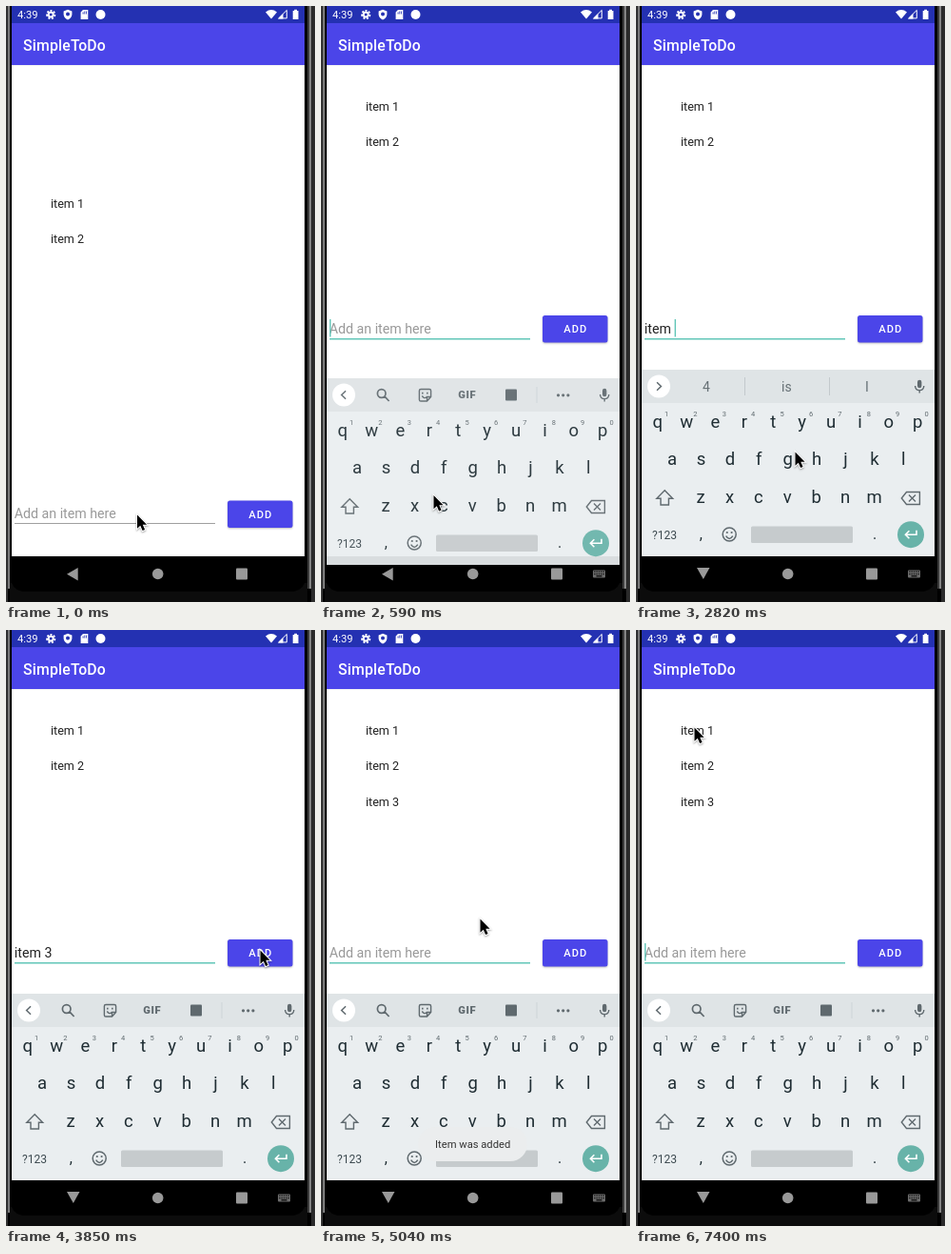
An HTML page with a canvas that plays this animation: 325 px wide and 626 px high, repeating every 8 s.

```html
<!DOCTYPE html>
<html lang="en">
<head>
<meta charset="utf-8">
<title>To-do list demo</title>
<style>
  html, body { margin: 0; width: 100%; height: 100%; overflow: hidden; background: #000; }
  canvas { display: block; }
</style>
</head>
<body>
<canvas id="stage" width="325" height="626"></canvas>
<script>
const W = 325, H = 626, LOOP = 8000;
const stage = document.getElementById('stage').getContext('2d');
const keyLayer = document.createElement('canvas');
keyLayer.width = W;
keyLayer.height = H;
const keys = keyLayer.getContext('2d');
let c = stage;

const INK = '#1f2d33', ICON = '#5f696e', INDIGO = '#4b45e9', TEAL = '#62c6b8';
const SCREEN = new Path2D('M6 0H314V599Q313 615 298 615H22Q7 615 6 599Z');

// Each step overrides part of the state before it: [time, mouse, changes]
const steps = [
  [0, [137.5, 533.5], { up: false, focus: false, caret: false, kb: null, hideNav: false,
                        text: '', words: null, press: 0, items: 2, toast: 0 }],
  [150, [137, 533], { focus: true, caret: true }],
  [300, [127, 528], { up: true, kb: [75, .25] }],
  [440, [114, 520.5], { kb: [38, .6] }],
  [590, [118, 513], { kb: [9, .93] }],
  [740, [133, 499], { kb: [0, 1], hideNav: true, caret: false }],
  [890, [150, 483], {}],
  [1030, [163, 471], {}],
  [1180, [167, 467.5], { caret: true }],
  [1780, null, { caret: false }],
  [2080, null, { text: 'i', caret: true, words: ['I', 'in', 'is'] }],
  [2220, null, { text: 'it', words: ['it', 'it’s', 'its'] }],
  [2370, null, { text: 'ite', words: ['ite', 'item', 'items'] }],
  [2520, null, { text: 'item', words: ['item', 'items', 'itemized'] }],
  [2820, null, { text: 'item ', words: ['4', 'is', 'I'] }],
  [3260, null, { text: 'item 3', words: null }],
  [3410, [222, 441], {}],
  [3560, [314, 385], {}],
  [3700, [294, 346], {}],
  [3850, [267, 335.5], { caret: false }],
  [4300, null, { press: .16 }],
  [4450, null, { press: .1, text: '', items: 3, caret: true }],
  [4600, [255, 331], { press: 0, toast: .3 }],
  [4740, [220, 316], { toast: .8 }],
  [4890, [180, 304], { toast: 1 }],
  [5040, [167, 302.5], { caret: false }],
  [5330, [163, 290], { caret: true }],
  [5480, [146, 254], {}],
  [5630, [124, 216], {}],
  [5780, [108, 190], {}],
  [5930, [102, 181], { caret: false }],
  [6380, [94, 163], { caret: true, toast: .8 }],
  [6530, [81, 138], { toast: .35 }],
  [6670, [69, 115], { toast: 0 }],
  [6820, [63, 104], {}],
  [6960, [61, 101.5], { caret: false }],
  [7400, null, { caret: true }]
];

function stateAt(time) {
  const state = {};
  for (const [start, mouse, changes] of steps) {
    if (start > time) break;
    Object.assign(state, changes);
    if (mouse) state.mouse = mouse;
  }
  return state;
}

function rect(x, y, w, h, color, r = 0) {
  c.fillStyle = color;
  c.beginPath();
  c.roundRect(x, y, w, h, r);
  c.fill();
}
function disc(x, y, r, color) {
  rect(x - r, y - r, 2 * r, 2 * r, color, r);
}
function fill(d, color) {
  c.fillStyle = color;
  c.fill(new Path2D(d), 'evenodd');
}
function line(d, color, width = 1.3) {
  c.strokeStyle = color;
  c.lineWidth = width;
  c.stroke(new Path2D(d));
}
function label(str, x, y, size, color, { weight = 400, align = 'left', gap = 0 } = {}) {
  c.font = `${weight} ${size}px Roboto, sans-serif`;
  c.letterSpacing = gap + 'px';
  c.textAlign = align;
  c.fillStyle = color;
  c.fillText(str, x, y);
}
function centered(str, x, y, size, color, weight) {
  label(str, x, y, size, color, { align: 'center', weight });
}
function shadow(color, blur, dy) {
  c.shadowColor = color;
  c.shadowBlur = blur;
  c.shadowOffsetY = dy;
}

function drawPhone() {
  rect(0, 0, W, H, '#000');
  rect(0, 0, 2, H, '#303030');
  rect(2, 0, 2, 612, '#7c7c7c');
  rect(317, 0, 2, 612, '#3a3a3a');
  rect(319, 0, 2, 612, '#858585');
  rect(321, 0, 4, H, '#2a2a2a');
  fill('M4 606H6Q9 615 22 615H298Q311 615 314 606H317V626H4Z', '#0c0c0c');
}

function drawStatusBar() {
  rect(6, 0, 308, 18, '#2431b2');
  label('4:39', 12, 13, 11.2, '#fff');
  c.setLineDash([2, 1.6]);
  line('M43 9a4.2 4.2 0 1 0 8.4 0a4.2 4.2 0 1 0 -8.4 0', '#fff', 1.8);
  c.setLineDash([]);
  line('M44.7 9a2.5 2.5 0 1 0 5 0a2.5 2.5 0 1 0 -5 0', '#fff', 2);
  fill('M65 3.8L69.4 5.5V9Q69 12.6 65 14.4Q61 12.6 60.6 9V5.5ZM63 8.6a2 2 0 1 0 4 0a2 2 0 1 0 -4 0', '#fff');
  fill('M81 4H86.3V14H78.6V6.6ZM80.6 6.5V8.5H81.5V6.5ZM82.4 5.5V8.5H83.2V5.5ZM84.2 5.5V8.5H85V5.5Z', '#fff');
  disc(99.5, 9, 5, '#fff');
  fill('M273 6.4Q279 1.8 285 6.4L279 13.6Z', '#fff');
  line('M286.7 12.9L295.3 4.4V12.9Z', '#fff', 1);
  fill('M286 13.4L291.5 8V13.4Z', '#fff');
  fill('M301.7 5H303.2V3.8H306V5H307.5V14H301.7Z', '#fff');
}

function drawApp(s) {
  rect(6, 18, 308, 560, '#fff');
  shadow('rgba(0,0,0,.12)', 1.5, .5);
  rect(6, 18, 308, 44, INDIGO);
  shadow('transparent', 0, 0);
  drawStatusBar();
  label('SimpleToDo', 18, 46.5, 15.8, '#fff', { weight: 500, gap: .2 });

  const top = s.up ? 110 : 212;
  for (let i = 0; i < s.items; i++) label('item ' + (i + 1), 47, top + i * 37.4, 12.6, '#222');

  c.save();
  c.translate(0, s.up ? -194.6 : 0);
  label(s.text || 'Add an item here', 8.8, 538.2, 14.2, s.text ? '#222' : '#999');
  const end = 9 + (s.text ? c.measureText(s.text).width : 0);
  if (s.focus) rect(9, 543.6, 211, 1.4, TEAL);
  else rect(9, 543, 211, 1, '#a0a0a0');
  if (s.caret) rect(end, 523.6, 1.4, 18.5, TEAL);

  shadow('rgba(0,0,0,.25)', 2, 1);
  rect(233, 519.6, 68.5, 28.4, INDIGO, 2.5);
  shadow('transparent', 0, 0);
  if (s.press) rect(233, 519.6, 68.5, 28.4, `rgba(255,255,255,${s.press})`, 2.5);
  label('ADD', 255.3, 538, 11.2, '#fff', { weight: 500, gap: 1 });
  c.restore();
}

function drawNav(s) {
  const grey = '#999';
  c.fillStyle = '#000';
  c.save();
  c.clip(SCREEN);
  rect(6, 578, 308, 40, '#000');
  c.restore();
  fill(s.hideNav ? 'M64 590H77.5L70.8 602Z' : 'M64 596.7L75.7 590V603.5Z', grey);
  disc(159.7, 596.5, 5.8, grey);
  rect(242, 590.6, 12, 12, grey, 1);
  if (!s.kb) return;
  rect(286, 592.5, 13, 8, '#6c6c6c', 1);
  for (let i = 0; i < 5; i++) {
    rect(287.3 + i * 2.3, 593.6, 1.2, 1.2, '#000');
    rect(287.3 + i * 2.3, 596, 1.2, 1.2, '#000');
  }
  rect(289.5, 598.2, 6, 1.2, '#000');
}

function drawToolIcons() {
  line('M59.4 398a4.3 4.3 0 1 0 8.6 0a4.3 4.3 0 1 0 -8.6 0M67 401.2L71.6 406', ICON, 1.7);
  line('M105 393.5H114Q115.6 393.5 115.6 395V401.5L111.5 406H105Q103.4 406 103.4 404.4V395Q103.4 393.5 105 393.5ZM115.6 401.5H111.5V406M106.3 400.5Q108.6 404 111 401.8', ICON, 1.4);
  rect(106, 396.8, 1.6, 1.6, ICON);
  rect(111, 396.8, 1.6, 1.6, ICON);
  label('GIF', 144.3, 403.3, 11.2, ICON, { weight: 900, gap: .6 });
  rect(194, 393.5, 12, 12, ICON, 1);
  rect(226.5, 391, 1, 17, '#ced4d7');
  for (const x of [249.5, 254.7, 259.9]) disc(x, 399.8, 1.6, ICON);
}

function drawWords(words) {
  words.forEach((word, i) => centered(word, 74 + i * 84.4, 405, 14, '#667075'));
  rect(114, 390, 1, 19, '#c3c9cc');
  rect(203, 390, 1, 19, '#c3c9cc');
}

function drawKeyboard(words) {
  rect(6, 382, 308, 196, '#eaeef0');
  rect(6, 382, 308, 35, '#dfe4e6');
  disc(24, 399.5, 12, '#fff');
  line(words ? 'M22 395.3L26.4 399.5L22 403.7' : 'M26 395.3L21.6 399.5L26 403.7', ICON, 1.5);
  if (words) drawWords(words);
  else drawToolIcons();
  rect(296, 392.8, 4.4, 8.4, ICON, 2.2);
  line('M293.6 399Q293.8 403.6 298.2 403.6Q302.6 403.6 302.8 399M298.2 403.6V406.6', ICON, 1.4);

  const rows = [['qwertyuiop', 22.7, 443], ['asdfghjkl', 38.1, 482.3], ['zxcvbnm', 68.1, 522]];
  for (const [letters, x, y] of rows)
    [...letters].forEach((ch, i) => centered(ch, x + i * 30.4, y, 18.5, INK));
  for (let i = 0; i < 10; i++) centered((i + 1) % 10, 32 + i * 30.4, 430.5, 7.5, ICON);

  line('M30.2 508.8L38.6 517.2H34.4V524H26V517.2H21.8Z', ICON, 1.4);
  line('M284.5 510.5H298.4V523.5H284.5L279.3 517ZM287 513.6L294 520.4M294 513.6L287 520.4', ICON, 1.4);
  centered('?123', 30, 559.5, 12, '#3c494f');
  centered(',', 68.3, 559.5, 16, INK);
  line('M91.2 555a7 7 0 1 0 14 0a7 7 0 1 0 -14 0M94.6 556.6Q98.2 562.2 101.8 556.6', ICON, 1.5);
  disc(95.8, 553, 1.1, ICON);
  disc(100.6, 553, 1.1, ICON);
  rect(121, 546.5, 107, 17.5, '#c6cbcd', 1.5);
  centered('.', 251, 559.5, 16, INK);
  disc(289, 555.2, 14, '#68b3a9');
  line('M295 550.8V555.2H283.6M287.4 551.2L283.4 555.2L287.4 559.2', '#fff', 1.6);
}

function drawToast(alpha) {
  c.save();
  c.globalAlpha = alpha;
  rect(102, 522, 115, 36, '#ebedee', 18);
  label('Item was added', 120, 544.2, 11.2, '#333');
  c.restore();
}

function drawMouse([x, y]) {
  c.save();
  c.translate(x, y);
  const arrow = 'M.5 1V15.2L3.8 12.2L6.1 17.6L8.6 16.5L6.3 11.3H10.6Z';
  shadow('rgba(0,0,0,.35)', 2, 1);
  line(arrow, '#fff', 2);
  shadow('transparent', 0, 0);
  fill(arrow, '#000');
  c.restore();
}

function draw(now) {
  const s = stateAt(now % LOOP);
  c = stage;
  drawPhone();
  drawApp(s);
  drawNav(s);
  if (s.kb) {
    const [offset, alpha] = s.kb;
    c = keys;
    c.clearRect(0, 0, W, H);
    drawKeyboard(s.words);
    c = stage;
    c.save();
    c.clip(SCREEN);
    c.globalAlpha = alpha;
    c.drawImage(keyLayer, 0, offset);
    c.restore();
  }
  if (s.toast) drawToast(s.toast);
  drawMouse(s.mouse);
}

const begin = performance.now();
function tick() {
  draw(performance.now() - begin);
  requestAnimationFrame(tick);
}
tick();
</script>
</body>
</html>
```
